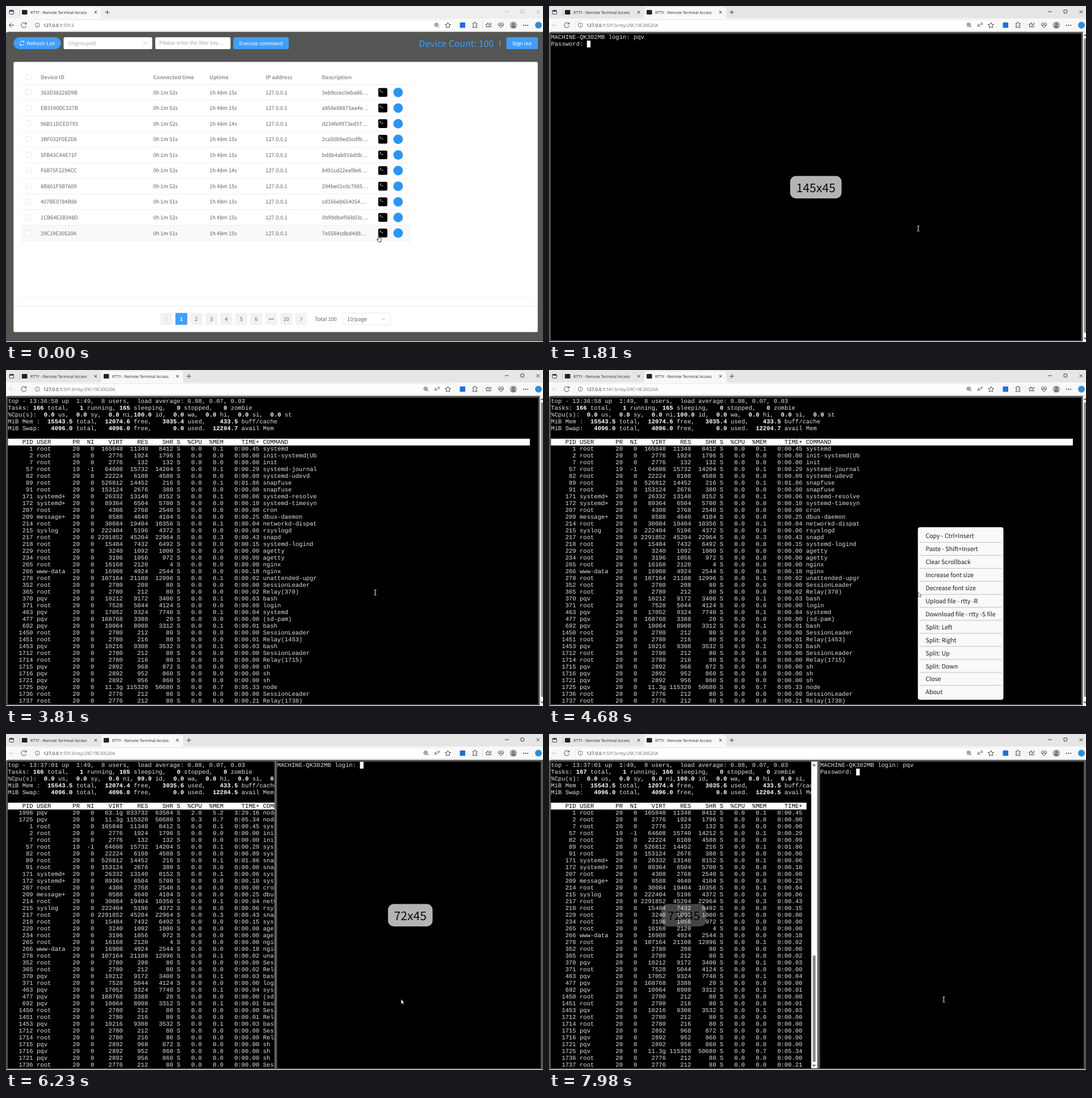
Animation of 946 by 592 pixels, one loop 8 s. Source, as an HTML page:

```html
<!DOCTYPE html>
<html lang="en">
<head>
<meta charset="utf-8">
<title>Remote terminal</title>
<style>
html, body { margin: 0; width: 100%; height: 100%; overflow: hidden; background: #fff; }
svg { display: block; }
text { white-space: pre; text-rendering: geometricPrecision; }
.ui { font: 6.9px "Open Sans", "Noto Sans", sans-serif; fill: #222; }
.url { font-size: 7.85px; fill: #666; }
.cjk { font: 9.24px "Noto Sans CJK SC", "Noto Sans CJK JP", "Noto Sans", sans-serif; fill: #606266; }
.head { font-weight: 700; fill: #909399; }
.arial { font: 9.24px "Liberation Sans", Arial, sans-serif; fill: #fff; }
.mono { font: 10.567px "Liberation Mono", "Courier New", monospace; fill: #e2e2e2; }
.mono .b { font-weight: 700; fill: #fff; }
.mono .user { font-weight: 700; fill: #8ae234; }
.mono .dir { font-weight: 700; fill: #729fcf; }
.mono .inv { fill: #000; }
.mid { text-anchor: middle; }
.line { fill: none; stroke: #333; stroke-width: .9; }
</style>
</head>
<body>
<svg id="stage" width="946" height="592" viewBox="0 0 946 592">
  <g id="bar"></g>
  <g id="page"></g>
  <g id="term">
    <path d="M0 49q0-3.5 4-3.5H946V591H0Z" fill="#545654"/>
    <g id="scroll">
      <rect x="940.5" y="45.5" width="6" height="545.5" fill="#fafafa"/>
      <rect x="942.5" y="57" width="5" height="519" rx="2" fill="#8a8a8a"/>
      <path d="M941.5 53l3-4 3 4ZM941.5 584l3 4 3-4Z" fill="#777"/>
    </g>
    <svg id="main" x="3" y="48.5" height="540.5"></svg>
    <g id="split">
      <rect x="473" y="46" width="4.5" height="545" fill="#545654"/>
      <path d="M474 48V589" stroke="#8a8a8a" stroke-width=".8"/>
      <svg id="side" x="477.3" y="48.5" width="464.7" height="540.5"></svg>
    </g>
    <g id="paneScroll">
      <rect x="462" y="48.5" width="10.5" height="540.5" fill="#fcfcfc"/>
      <rect x="464.6" y="390" width="5" height="188" rx="2.5" fill="#8a8a8a"/>
      <path d="M463.8 56.5l3.2-4.5 3.2 4.5ZM463.8 582.5l3.2 4.5 3.2-4.5Z" fill="#777"/>
    </g>
    <g id="overlays"></g>
    <g id="menu"></g>
  </g>
  <g id="pointer"></g>
</svg>
<script>
const LOOP = 8000, CELL = 6.341, ROW = 12;
const USER = 'pqv', HOST = 'MACHINE-QK302MB';
const $ = id => document.getElementById(id);

const rect = (x, y, w, h, fill, rx = 0, more = '') =>
  `<rect x="${x}" y="${y}" width="${w}" height="${h}" fill="${fill}" rx="${rx}" ${more}/>`;
const text = (x, y, s, cls, more = '') => `<text x="${x}" y="${y}" class="${cls}" ${more}>${s}</text>`;
const line = (d, color = '#333', more = '') => `<path d="${d}" class="line" style="stroke:${color}" ${more}/>`;
const circle = (x, y, r, fill) => `<circle cx="${x}" cy="${y}" r="${r}" fill="${fill}"/>`;
const clamp = v => Math.max(0, Math.min(1, v));

const cache = {};
function put(id, html) {
  if (cache[id] !== html) $(id).innerHTML = cache[id] = html;
}
const show = (id, on) => { $(id).style.display = on ? '' : 'none'; };

/* Browser bar */
const cross = (x, y, r, color) => line(`M${x - r} ${y - r}l${2 * r} ${2 * r}m0 ${-2 * r}l${-2 * r} ${2 * r}`, color);
const tabShape = (x, w, fill) =>
  `<path d="M${x - 3} 22q3 0 3-3V6q0-4 4-4h${w - 8}q4 0 4 4v13q0 3 3 3Z" fill="${fill}"/>`;
const tabLabel = x => rect(x, 7, 9.5, 8, '#222', 1) + text(x + 15, 13.5, 'RTTY - Remote Terminal Access', 'ui');
const magnifier = x => `<circle cx="${x - .7}" cy="33" r="3.1" class="line"/>` +
  line(`M${x + 1.7} 35.4l2.4 2.4M${x - 2.2} 33h3M${x - .7} 31.5v3`);
const star = x => line(`M${x} 29l1.5 3.2 3.5.4-2.6 2.4.7 3.5-3.1-1.8-3.1 1.8.7-3.5-2.6-2.4 3.5-.4Z`);

function browserBar(t) {
  const grow = 1 - (1 - clamp((t - 340) / 300)) ** 3;
  const opened = t >= 340, active = t >= 70, ready = t >= 700;
  const control = active ? '#222' : '#aaa', w = 144 * grow, plus = 178.5 + 143.5 * grow;
  let s = rect(0, 0, 946, 23, active ? '#e6e6e6' : '#eeeeee') + rect(0, 22, 946, 24, '#f8f8f8');
  s += opened ? (w > 10 ? tabShape(168, w, '#f8f8f8') : '') : tabShape(25, 142, '#f8f8f8');
  s += line('M24.5 6v11', '#bbb') + `<rect x="6" y="7.5" width="7.5" height="7" rx="1.5" class="line"/>` + rect(6, 7.5, 7.5, 2.3, '#333', 1);
  s += tabLabel(28) + cross(158, 11, 2.3, '#222');
  if (opened) {
    s += `<svg x="168" y="0" width="${Math.max(0, w - 18)}" height="22">${tabLabel(4)}</svg>`;
    if (w > 24) s += cross(158 + w, 11, 2.3, '#222');
  }
  s += line(`M${plus - 4} 11h8m-4-4v8`);
  s += line('M879 10h6.5M934.5 7.5l5.5 5.5m0-5.5l-5.5 5.5', control) +
    `<rect x="907" y="7" width="5.5" height="5.5" rx=".8" class="line" style="stroke:${control}"/>`;
  s += line('M14 33.7H5.5m4-4l-4 4 4 4', opened ? '#ccc' : '#222');
  s += line('M35 31.3a4.4 4.4 0 1 0 .6 3.4M35.6 28.8v3h-3');
  s += rect(46, 24.3, 743.5, 18.7, '#fff', 9.3, 'stroke="#e0e0e0" stroke-width=".7"');
  s += '<circle cx="55.2" cy="33.7" r="4" class="line" style="stroke:#666"/>' + line('M55.2 33v2.8M55.2 31.2v.9', '#666');
  s += text(66, 36.6, '<tspan fill="#111">127.0.0.1</tspan>:5913' + (opened ? '/rtty/29C19E30520A' : ''), 'ui url');
  s += magnifier(ready ? 740 : 759) + star(778.5);
  if (ready) s += text(754.5, 37, 'A', 'ui', 'style="font-size:8px"') + line('M760.5 30.2q1.5 1.3 0 2.7m1.7-4q2.4 2.3 0 5', '#333');
  s += rect(799.5, 29, 9.5, 9.5, '#1f6fe0', 1);
  s += line('M822.5 30.5h2q0-2 1.6-2t1.6 2h2v2.6q-2 0-2 1.4t2 1.4v2h-7.2v-2.2q1.6 0 1.6-1.5t-1.6-1.5Z') + line('M839.5 28v12', '#ddd');
  s += line('M849 29.5l1.2 2.6 2.8.3-2 2 .6 3-2.6-1.5-2.6 1.5.6-3-2-2 2.8-.3ZM852.5 30.5h3m-2 3h2m-3 3h3');
  s += line('M872 38.5l-4-4.4q-1.5-3.6 1.6-4.3 1.6 0 2.4 1.6.8-1.6 2.4-1.6 3.1.7 1.6 4.3ZM868 33.7h2.6l1.2-1.6 1 3 1-1.4h2.5');
  s += circle(893.8, 33.8, 6.3, '#aaa9a7') + circle(893.8, 32, 2.1, '#666') + '<path d="M890 38q.4-3 3.8-3t3.8 3Z" fill="#666"/>';
  s += [912, 915.5, 919].map(x => circle(x, 34, .9, '#222')).join('');
  return s + circle(938, 33.7, 6, '#2f8fd8');
}

/* Device list */
const DEVICES = `363D38228D9B 52 15 3eb9ccec0eba86
EB3190DC327B 52 15 a858e88875aa4e
96B11DCED793 52 14 d234fe9973ed57
3BF032F0E2D6 51 15 2ca50b9ed3cdfb
5FB43CA4E71F 51 15 bd8b4ab916d0b
F6B75F2294CC 52 14 8491cd22eaf8e6
8B801F5B7609 52 15 294be01c0c7985
407BE0784B88 51 15 cd166eb654054
1CB64E2B348D 52 15 0b99dbef56b03c
29C19E30520A 51 15 7e5584cdbd4d8`.split('\n').map(l => l.split(' '));
const COLUMNS = [61, 259.3, 358.5, 457.3, 556.5];

function devicePage() {
  const blue = '#409eff', border = 'stroke="#dcdfe6" stroke-width=".7"';
  const cells = (y, list, cls) => list.map((s, i) => text(COLUMNS[i], y + 3.4, s, cls)).join('') +
    rect(35.2, y - 4.9, 9, 9, '#fff', 1.3, border);
  const chevron = (x, y) => line(`M${x - 3.3} ${y - 1.7}l3.3 3.4 3.3-3.4`, '#a8abb2');
  let s = '<path d="M0 49q0-3.5 4-3.5H946V591H0Z" fill="#545654"/>';
  s += rect(13.3, 55, 83.6, 21, blue, 10.5) + text(36.5, 68.7, 'Refresh List', 'arial');
  s += line('M24.6 64.5q.8-3 3.6-3 2.2 0 3.2 1.8m.2-2.2v2.4h-2.4M31.8 66.5q-.8 3-3.6 3-2.2 0-3.2-1.8m-.2 2.2v-2.4h2.4', '#fff');
  s += rect(101.5, 55, 156, 21, '#fff', 2.6) + text(109.5, 69, 'Ungrouped', 'cjk', 'style="fill:#a8abb2"') + chevron(245.5, 65.7);
  s += rect(263, 55, 132.5, 21, '#fff', 2.6) + text(270, 68.4, 'Please enter the filter key...', 'arial', 'style="fill:#a8abb2"');
  s += rect(400.5, 55, 97.5, 21, blue, 2.6) + text(410.8, 68.7, 'Execute command', 'arial');
  s += text(727.3, 71.8, 'Device Count: 100', 'cjk', `style="font-size:15.84px;fill:${blue}"`) + line('M870 61v9.5', '#bbb');
  s += rect(881.5, 55, 55.5, 21, blue, 2.6) + text(891.7, 68.7, 'Sign out', 'arial');
  s += rect(13.3, 98.5, 923.4, 476, '#fff', 2.6);
  s += rect(27, 386.5, 686, 27.3, '#f8f9fb');
  s += cells(125.3, ['Device ID', 'Connected time', 'Uptime', 'IP address', 'Description'], 'cjk head') + line('M27 138.5H713', '#ebeef5');
  DEVICES.forEach(([id, connected, up, note], i) => {
    const y = 152.3 + 27.54 * i;
    s += cells(y, [id, `0h 1m ${connected}s`, `1h 48m ${up}s`, '127.0.0.1', note + '…'], 'cjk');
    s += line(`M27 ${y + 13.8}H713`, '#ebeef5');
    s += rect(655.8, y - 7.8, 16, 15.4, '#000', 2.2) + line(`M658.3 ${y - 5}l2.2 1.8-2.2 1.8M661.3 ${y - .8}h3`, '#fff');
    s += circle(690.8, y, 8.4, '#2b95f5');
  });
  s += line('M27 515H921M13.3 528.5H936.7', '#ebeef5');
  ['', 1, 2, 3, 4, 5, 6, '', 10, ''].forEach((label, i) => {
    const x = 272 + 26.4 * i, on = label === 1;
    s += rect(x, 540.8, 21, 21, on ? blue : '#f0f2f5', 1.3);
    s += text(x + 10.5, 555, label, 'cjk mid', on ? 'style="fill:#fff;font-weight:700"' : '');
  });
  s += line('M284 548.2l-3 3.2 3 3.2', '#b5b8be') + line('M518.6 548.2l3 3.2-3 3.2', '#606266');
  s += [464, 467.2, 470.4].map(x => circle(x, 551.5, 1.1, '#606266')).join('');
  s += text(543.8, 555, 'Total 100', 'cjk') + rect(593, 540.8, 84, 21, '#fff', 2.6, border);
  return s + text(601, 555, '10/page', 'cjk') + chevron(664.8, 551.5);
}

/* Terminal contents */
const MOTD = `Welcome to Ubuntu 22.04.5 LTS (GNU/Linux 5.15.167.4-microsoft-standard-WSL2 x86_64)

 * Documentation:  https://help.ubuntu.com
 * Management:     https://landscape.canonical.com
 * Support:        https://ubuntu.com/pro

 System information as of Sun Jul 20 13:36:56 CST 2025

  System load:  0.08                Processes:             169
  Usage of /:   3.7% of 1006.85GB   Users logged in:       1
  Memory usage: 20%                 IPv4 address for eth1: 192.168.8.223
  Swap usage:   0%

 * Strictly confined Kubernetes makes edge and IoT secure. Learn how MicroK8s
   just raised the bar for easy, resilient and secure K8s cluster deployment.

   https://ubuntu.com/engage/secure-kubernetes-at-the-edge
Last login: Sun Jul 20 13:35:17 CST 2025 on pts/8`.split('\n');

// pid, user, virt, res, shr, command, cpu time in 1/100 s
const PROCESSES = `1 root 165848 11348 8412 systemd 45
2 root 2776 1924 1796 init-systemd(Ub
7 root 2776 132 132 init
57 root 64608 15732 14204 systemd-journal 29
82 root 22224 6108 4588 systemd-udevd 9
89 root 526812 14452 216 snapfuse 186
91 root 153124 2676 380 snapfuse
171 systemd+ 26332 13140 8152 systemd-resolve 6
172 systemd+ 89364 6504 5700 systemd-timesyn 10
207 root 4308 2768 2540 cron
209 message+ 8588 4640 4104 dbus-daemon 25
214 root 30084 19404 10356 networkd-dispat 4
215 syslog 222404 5196 4372 rsyslogd 6
217 root 2291852 45204 22964 snapd 43
218 root 15484 7432 6492 systemd-logind 15
229 root 3240 1092 1000 agetty
234 root 3196 1056 972 agetty
265 root 16168 2120 4 nginx
266 www-data 16908 4924 2544 nginx 18
278 root 107164 21108 12996 unattended-upgr 2
352 root 2780 208 80 SessionLeader
365 root 2780 212 80 Relay(370) 2
370 ${USER} 10212 9172 3400 bash 3
371 root 7528 5044 4124 login
463 ${USER} 17052 9324 7740 systemd 4
477 ${USER} 168768 3388 20 (sd-pam)
692 ${USER} 10064 8908 3312 bash 1
1450 root 2780 212 80 SessionLeader
1451 root 2780 216 80 Relay(1453) 1
1453 ${USER} 10216 9308 3532 bash 3
1712 root 2780 212 80 SessionLeader
1714 root 2780 216 80 Relay(1715)
1715 ${USER} 2892 968 872 sh
1716 ${USER} 2892 952 860 sh
1721 ${USER} 2892 956 860 sh
1725 ${USER} 11.3g 115320 50680 node 533
1736 root 2776 212 80 SessionLeader
1737 root 2776 212 80 Relay(1738) 21`.split('\n');

const WIDTHS = [7, -8, 3, 3, 7, 6, 6, 1, 5, 5, 9, -1];
const columns = list => list.map((s, i) => WIDTHS[i] < 0 ? s.padEnd(-WIDTHS[i]) : s.padStart(WIDTHS[i])).join(' ');
const HEADER = columns('PID USER PR NI VIRT RES SHR S %CPU %MEM TIME+ COMMAND'.split(' '));

function processLine(entry, cpu = '0.0') {
  const [pid, user, virt, res, shr, command, cs = 0] = entry.split(' ');
  const nice = pid === '57' ? ['19', '-1'] : ['20', '0'];
  const time = Math.floor(cs / 6000) + ':' + (cs % 6000 / 100).toFixed(2).padStart(5, '0');
  const mem = (res / 15543.5 / 10.24).toFixed(1);
  return columns([pid, user, ...nice, virt, res, shr, 'S', cpu, mem, time, command]);
}

const tag = (cls, s) => `<tspan class="${cls}">${s}</tspan>`;
const bold = s => s.replace(/[\d.]+(?= (total|running|sleeping|stopped|zombie|us|sy|ni|id|wa|hi|si|st|free|used|buff|avail)\b)|[\d.]+(?= buff)/g, n => tag('b', n));

function topScreen({ time, asleep, idle, free, used, avail, list, cols }) {
  const head = [`Tasks: ${asleep + 1} total,   1 running, ${asleep} sleeping,   0 stopped,   0 zombie`,
    `%Cpu(s):  0.0 us,  0.0 sy,  0.0 ni,${idle} id,  0.0 wa,  0.0 hi,  0.0 si,  0.0 st`,
    `MiB Mem :  15543.5 total,  ${free} free,   ${used} used,    433.5 buff/cache`,
    `MiB Swap:   4096.0 total,   4096.0 free,      0.0 used.  ${avail} avail Mem`].map(bold);
  const rows = list.map(l => l.slice(0, cols));
  return rect(.4, 6 * ROW + .5, cols * CELL, ROW, '#fff') + screen([
    `top - ${time} up  1:49,  8 users,  load average: 0.08, 0.07, 0.03`,
    ...head, '', tag('inv', HEADER.slice(0, cols)), ...rows]);
}
const screen = lines => lines.map((l, i) => text(.4, 9.4 + ROW * i, l, 'mono')).join('');

const later = { time: '13:37:01', free: '12074.4', used: '3035.6', avail: '12204.5' };
const aged = PROCESSES.map(l => l.replace('node 533', 'node 534'));
const node = aged.find(l => l.endsWith('534'));
const TOP_FIRST = topScreen({ time: '13:36:58', asleep: 165, idle: '100.0', free: '12074.6', used: '3035.4',
  avail: '12204.7', list: PROCESSES.map(l => processLine(l)), cols: 145 });
const TOP_BUSY = topScreen({ ...later, asleep: 165, idle: ' 99.9', cols: 145,
  list: [processLine(`1998 ${USER} 63.1g 833732 63584 node 20916`, '2.0'), processLine(node, '0.3'),
    ...aged.filter(l => l !== node).slice(0, 36).map(l => processLine(l))] });
const TOP_NARROW = topScreen({ ...later, asleep: 166, idle: '100.0', cols: 71,
  list: aged.map(l => processLine(l.replace('15732 14204', '15740 14212'))) });

const typed = (t, times, s) => s.slice(0, times.filter(at => t >= at).length);

function withCursor(lines, blinkOff) {
  const col = lines[lines.length - 1].replace(/<[^>]*>/g, '').length;
  const block = blinkOff ? '' : rect(.4 + col * CELL, (lines.length - 1) * ROW + .5, CELL, ROW, '#fff');
  return screen(lines) + block;
}

function mainScreen(t) {
  if (t >= 6370) return TOP_NARROW;
  if (t >= 6160) return TOP_BUSY;
  if (t >= 3810) return TOP_FIRST;
  const lines = [`${HOST} login: ` + typed(t, [1210, 1350, 1480], USER)];
  if (t >= 1810) lines.push('Password: ');
  if (t >= 2490) lines.push(...MOTD, `${tag('user', USER + '@' + HOST)}:${tag('dir', '~')}$ ` + typed(t, [3220, 3320, 3420], 'top'));
  else if (t >= 2140) lines.push('');
  if (t >= 3680) lines.push('');
  return withCursor(lines, (t >= 1160 && t < 1210) || (t >= 3090 && t < 3220));
}

function sideScreen(t) {
  if (t < 6160) return '';
  const lines = [`${HOST} login: ` + typed(t, [7100, 7300, 7430], USER)];
  if (t >= 7700) lines.push('Password: ');
  return withCursor(lines, t >= 6770 && t < 7100);
}

/* Size badge: holds for 1.5 s, then fades */
function badge(t, label, x, from, until = LOOP) {
  const alpha = .75 * (1 - clamp((t - from - 1500) / 180));
  if (t < from || t >= until || !alpha) return '';
  const w = label.length > 5 ? 90.5 : 78.5;
  return `<g opacity="${alpha.toFixed(3)}">` + rect(x - w / 2, 299.5, w, 39.4, '#f0f0f0', 9.9) +
    text(x, 328.3, label, 'cjk mid', 'style="font-size:21.12px;fill:#101010"') + '</g>';
}

/* Context menu */
const ITEMS = ['Copy - Ctrl+Insert', 'Paste - Shift+Insert', 'Clear Scrollback', 'Increase font size', 'Decrease font size',
  'Upload file - rtty -R', 'Download file - rtty -S file', 'Split: Left', 'Split: Right', 'Split: Up', 'Split: Down', 'Close', 'About'];
const PITCH = 22.92;
function menu(hover) {
  return rect(649.8, 277, 150.7, 304, '#f9f9f9', 4) + ITEMS.map((s, i) => {
    const y = 281 + PITCH * i;
    return (i === hover ? rect(652.5, y, 145, 22.4, '#e2e2e2') : '') + text(663.5, y + 15.3, s, 'cjk', 'style="font-size:10.56px;fill:#1a1a1a"') +
      (i < ITEMS.length - 1 ? line(`M652.5 ${y + 22.6}H797.5`, '#b8b8b8', 'stroke-width=".7"') : '');
  }).join('');
}

/* Pointer */
const SHAPES = {
  hand: '<path d="M-.8 0Q0-1 .8 0V3.6l3 .8q1 .4.9 1.6L4 10.6H-.4L-3 7q-.4-1.2.6-1.2L-.8 7Z" fill="#fff" stroke="#000" stroke-width=".8"/>',
  beam: '<path d="M-2-4.6Q0-4.6 0-3.8 0-4.6 2-4.6M0-3.8V3.8M-2 4.6Q0 4.6 0 3.8 0 4.6 2 4.6" fill="none" stroke="#fff" stroke-width="1"/>',
  arrow: '<path d="M0 0V8.2L1.9 6.5 3.1 9.2 4.4 8.6 3.2 6H5.7Z" fill="#fff" stroke="#222" stroke-width=".6"/>'
};
function pointerAt(t) {
  const mix = (a, b, u) => a + (b - a) * u;
  if (t < 480) {
    const u = clamp((t - 70) / 410);
    return ['hand', mix(656.5, 650.5, u), mix(405, 392, u)];
  }
  if (t < 4610) return ['beam', 650.4, 392];
  if (t >= 6370) return ['beam', 695.5, 467.8];
  const u = clamp((t - 5340) / 490), s = u * u * (3 - 2 * u);
  return ['arrow', mix(650.6, 696, s), mix(391.3, 467.5, s)];
}

function render(t) {
  const isSplit = t >= 6090, menuOpen = t >= 4540 && !isSplit;
  const [shape, x, y] = pointerAt(t);
  put('bar', browserBar(t));
  show('page', t < 340);
  show('term', t >= 410);
  show('scroll', !isSplit);
  show('split', isSplit);
  show('paneScroll', t >= 6370);
  $('main').setAttribute('width', t >= 6370 ? 459 : isSplit ? 470 : 934.5);
  put('main', rect(0, 0, 940, 541, '#000') + (t >= 480 ? mainScreen(t) : ''));
  put('side', rect(0, 0, 470, 541, '#000') + sideScreen(t));
  put('overlays', badge(t, '147x45', 474.8, 480, 680) + badge(t, '145x45', 470.1, 680) +
    badge(t, '72x45', 712.2, 6160) + badge(t, '72x45', 237.4, 6370));
  put('menu', menuOpen ? menu(x > 652 ? Math.floor((y - 281) / PITCH) : -1) : '');
  put('pointer', `<g transform="translate(${x.toFixed(1)} ${y.toFixed(1)})">${SHAPES[shape]}</g>`);
}

$('page').innerHTML = devicePage();
function tick() {
  render(performance.now() % LOOP);
  requestAnimationFrame(tick);
}
tick();
</script>
</body>
</html>
```
